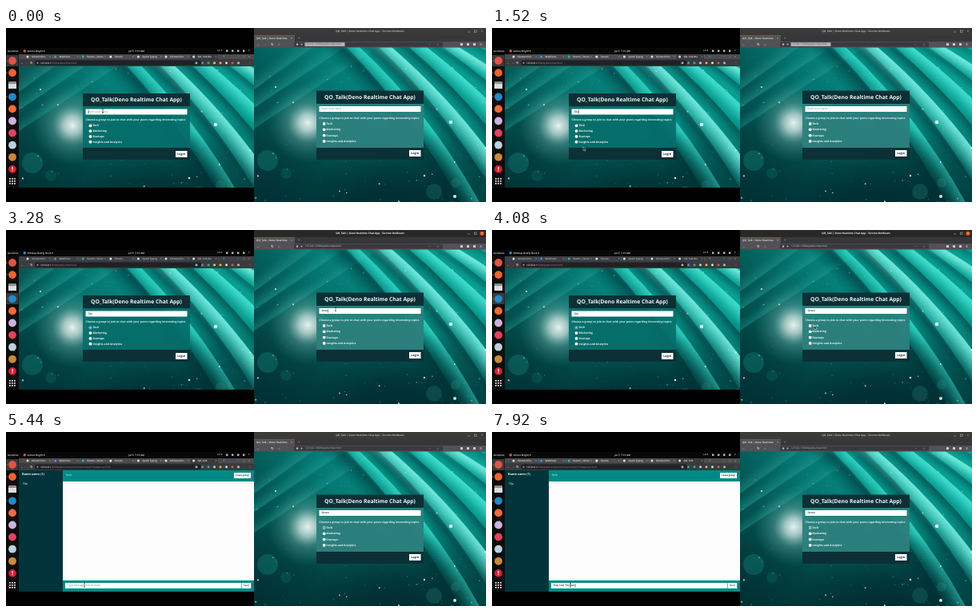
An HTML page with a canvas that plays this animation: 600 px wide and 218 px high, repeating every 8000 ms.

```html
<!DOCTYPE html>
<html lang="en">
<head>
<meta charset="utf-8">
<title>Chat demo</title>
<style>
html, body { margin: 0; width: 100%; height: 100%; overflow: hidden; background: #000; }
canvas { display: block; width: 600px; height: 218px; }
</style>
</head>
<body>
<canvas id="stage" width="600" height="218"></canvas>
<script>
const LOOP = 8000;
const APP = 'QO_Talk', USER = 'Tilo', PEER = 'Ovren';
const MESSAGE = `Hey I am ${USER} Ban`;
const TOPICS = ['Tech', 'Marketing', 'Startups', 'Insights and Analytics'];
const HOST = '127.0.0.1:5500/public/';
const DARK = '#0b3036';
const canvas = document.getElementById('stage');
let c = canvas.getContext('2d');

function rect(x, y, w, h, color) {
  c.fillStyle = color;
  c.fillRect(x, y, w, h);
}
function round(x, y, w, h, r, color) {
  c.fillStyle = color;
  c.beginPath();
  c.roundRect(x, y, w, h, r);
  c.fill();
}
function dot(x, y, r, color) {
  c.fillStyle = color;
  c.beginPath();
  c.arc(x, y, r, 0, 7);
  c.fill();
}
function line(color, width, ...points) {
  c.strokeStyle = color;
  c.lineWidth = width;
  c.beginPath();
  for (let i = 0; i < points.length; i += 2) c.lineTo(points[i], points[i + 1]);
  c.stroke();
}
function text(str, x, y, size, color, weight = 400, align = 'left') {
  c.font = `${weight} ${size}px "Open Sans", sans-serif`;
  c.textRendering = 'geometricPrecision';
  c.textBaseline = 'middle';
  c.textAlign = align;
  c.fillStyle = color;
  c.fillText(str, x, y);
  return c.measureText(str).width;
}

// Wallpaper, painted once and shown in both windows
function makeWallpaper() {
  const W = 294, H = 194;
  const layer = document.createElement('canvas');
  layer.width = W;
  layer.height = H;
  const screen = c;
  c = layer.getContext('2d');

  function wash(gradient, stops) {
    stops.forEach(stop => gradient.addColorStop(...stop));
    rect(0, 0, W, H, gradient);
  }
  wash(c.createLinearGradient(0, H, W, 0),
    [[0, '#01383b'], [.25, '#035553'], [.45, '#057671'], [.62, '#078a82'], [1, '#0aa79a']]);
  wash(c.createLinearGradient(0, 80, 0, H), [[0, 'rgba(0,44,48,0)'], [1, 'rgba(0,44,48,.7)']]);

  // A curved band from the top edge to the bottom, fading in towards its right side
  function beam(top, bottom, width, bulge, rgb, alpha) {
    c.lineWidth = 1.5;
    for (let i = 0; i < width; i++) {
      c.strokeStyle = `rgba(${rgb},${alpha * (i / width) ** 1.6})`;
      c.beginPath();
      c.moveTo(top + i, 0);
      c.quadraticCurveTo((top + bottom) / 2 + i + bulge, H / 2 - bulge, bottom + i, H);
      c.stroke();
    }
  }
  beam(40, -230, 34, 0, '40,150,140', .28);
  beam(80, -210, 34, 0, '40,160,150', .25);
  beam(126, -170, 30, 0, '40,160,150', .2);
  beam(80, 222, 36, 12, '0,50,54', .5);
  beam(106, 256, 26, 14, '50,215,198', .75);
  beam(132, 282, 24, 14, '0,66,68', .75);
  beam(140, 305, 32, 14, '120,240,226', .8);
  beam(172, 338, 22, 14, '0,84,82', .7);
  beam(186, 372, 30, 14, '70,228,212', .75);
  beam(216, 420, 20, 14, '0,100,96', .6);
  beam(226, 470, 30, 14, '120,240,225', .65);
  beam(256, 530, 26, 14, '0,122,114', .5);

  wash(c.createRadialGradient(190, 225, 10, 190, 225, 125),
    [[0, 'rgba(0,40,44,.9)'], [.5, 'rgba(0,40,44,.6)'], [1, 'rgba(0,40,44,0)']]);
  wash(c.createRadialGradient(67, 95, 0, 67, 95, 50),
    [[0, 'rgba(238,246,244,.97)'], [.22, 'rgba(205,228,224,.78)'], [.5, 'rgba(120,180,174,.38)'], [1, 'rgba(60,150,142,0)']]);

  dot(17, 142, 13, 'rgba(20,130,122,.4)');
  dot(40, 158, 7, 'rgba(20,130,122,.22)');
  dot(225, 181, 10, 'rgba(60,165,155,.2)');
  dot(252, 170, 6, 'rgba(60,165,155,.2)');

  let seed = 11;
  const random = () => (seed = seed * 16807 % 2147483647) / 2147483647;
  for (let i = 0; i < 130; i++) {
    const x = random() * W, y = H * (1 - random() ** 1.5 * .9);
    dot(x, y, .3 + random() ** 3 * .8, `rgba(225,255,250,${.35 + random() * .6})`);
  }
  dot(246, 94, 2.3, '#d5f4ef');
  dot(251, 187, 2, '#c4eee6');
  dot(213, 161, 1.2, '#d5f4ef');
  dot(27, 50, 1, '#d5f4ef');
  c = screen;
  return layer;
}
const wallpaper = makeWallpaper();

// Characters of str visible when typing starts at start with one key per step
const typed = (str, t, start, step) => str.slice(0, Math.max(0, Math.floor((t - start) / step) + 1));

function field(x, y, w, h, value, hint, caret) {
  rect(x, y, w, h, '#fff');
  const width = text(value || hint, x + 3, y + h / 2, 3.2, value ? '#222' : '#777', value ? 600 : 400);
  if (caret) rect(x + 3.3 + (value ? width : 0), y + 1.2, .5, h - 2.4, '#222');
}

function loginForm(x, top, { bodyTop, bodyColor, fieldY, labelY, radioY, gap, radioX, buttonY, value, caret, chosen }) {
  rect(x, top, 134, bodyTop - top, DARK);
  rect(x, bodyTop, 134, 150 - bodyTop, bodyColor);
  rect(x, 150, 134, 15, DARK);
  text(`${APP}(Deno Realtime Chat App)`, x + 67, (top + bodyTop) / 2 + .2, 6.75, '#f2f7f7', 700, 'center');
  field(x + 3.5, fieldY, 127, 7, value, 'Enter your name', caret);
  text('Choose a group to join to chat with your peers regarding interesting topics', x + 3.5, labelY, 3.38, '#e6f3f2', 700);
  TOPICS.forEach((topic, i) => {
    const y = radioY + i * gap;
    dot(x + radioX, y, 1.9, '#fff');
    if (chosen && i === 0) {
      dot(x + radioX, y, 1.6, '#1976d2');
      dot(x + radioX, y, .7, '#fff');
    }
    text(topic, x + radioX + 2.9, y + .2, 3.38, '#eef7f6', 700);
  });
  rect(x + 116, buttonY, 14.5, 8, '#fff');
  text('Login', x + 123.2, buttonY + 4, 3.6, '#17282b', 700, 'center');
}

function desktop(focusLeft) {
  rect(0, 25, 310, 8, '#080808');
  text('Activities', 2, 28.7, 3.1, '#e6e6e6', 600);
  dot(23.3, 28.7, 1.7, focusLeft ? '#d9574a' : '#2c8fd0');
  text(focusLeft ? 'Velora Bright ▾' : 'Nimbus Drafty Desk ▾', 26.5, 28.7, 3.1, '#e6e6e6', 600);
  text('Jul 5  7:15 AM', 163, 28.7, 3.1, '#eee', 600, 'center');
  text('en ▾', 264, 28.7, 3, '#ccc', 600);
  [275, 282, 289, 296].forEach(x => rect(x, 27.5, 2.4, 2.4, '#bbb'));
  text('▾', 303, 28.7, 3, '#ccc');

  rect(0, 33, 16, 167, '#0d0d0d');
  rect(.5, focusLeft ? 34 : 79, 15, 14, '#3a3a3a');
  const colors = ['#de5546', '#ee6430', '', '#2489ca', '#f36c3b', '#cdb4de', '#e2445c', '#b9d3dc', '#c98a3a', '#d51f35'];
  colors.forEach((color, i) => {
    if (color) dot(8, 41 + i * 15.1, 4.9, color);
  });
  round(3, 67, 10, 9, 1, '#8f8f8f');
  rect(3, 70, 10, 6, '#dedede');
  rect(7.4, 174, 1.2, 3.4, '#fff');
  rect(7.4, 178.3, 1.2, 1.2, '#fff');
  for (let i = 0; i < 9; i++) rect(4 + i % 3 * 3, 188 + Math.floor(i / 3) * 3, 1.8, 1.8, '#ddd');
  [41, 56, 86].forEach(y => dot(1, y, .7, '#e95420'));
}

function leftBrowser(focused, inChat) {
  rect(16, 33, 294, 6.5, focused ? '#4b4c4f' : '#3f4043');
  rect(16, 39, 294, 9, '#3a3b3e');
  const tabs = ['tilomon23/c', 'WebTools', 'Events | Deno', 'Tunelo', 'Quick Typing', 'tilomon23/c', inChat ? APP : `${APP} (De`];
  const icons = ['#ddd', '#4a90d9', '#28b5b0', '#eee', '#ddd', '#ddd', '#ddd'];
  tabs.forEach((name, i) => {
    const x = 26 + i * 34.6;
    if (i === 6) round(x - 3, 33.5, 35, 6, [2, 2, 0, 0], '#3a3b3e');
    dot(x + 1, 36, 1.5, icons[i]);
    text(name, x + 6, 36, 3, focused ? '#eceded' : '#c4c6c8', 600);
    text('×', x + 28, 36, 3.4, '#ddd');
    rect(x + 32, 34.5, .4, 3.5, '#777');
  });
  text('+', 271, 36, 4, '#ccc');
  ['−', '□', '×'].forEach((s, i) => text(s, 289 + i * 7, 36, 3.6, '#ccc'));
  text('←', 18, 43.7, 4, '#ddd', 600);
  text('→', 24, 43.7, 4, '#888', 600);
  text('↻', 30, 43.7, 4, '#ddd', 600);
  round(36, 40.5, 208, 6.3, 3, '#202124');
  dot(39.5, 43.7, 1, '#aaa');
  const hostWidth = text('127.0.0.1', 43, 43.7, 3.05, '#eee', 600);
  const path = inChat ? `:5500/public/index.html?username=${USER}&group=Tech` : ':5500/public/chat.html';
  text(path, 43 + hostWidth, 43.7, 3.05, '#969a9e');
  ['#aaa', '#4a92d8', '#35b369', '#ccc', '#e8b53b', '#ddd', '#dc5547', '#bbb']
    .forEach((color, i) => dot(238 + i * 7.5, 43.7, 1.5, color));
  text('⋮', 303, 43.7, 4, '#ccc');
}

function chatPage(value, caret) {
  rect(16, 48, 55, 152, '#00343a');
  text('Room users (1)', 20, 53.5, 3.8, '#fff', 700);
  text(USER, 21, 65, 3.4, '#e5f0f0', 600);
  rect(71, 48, 239, 152, '#008a86');
  text('Tech', 74.5, 54.5, 3.6, '#e4f5f3');
  rect(285, 51, 21, 7, '#fff');
  text('Leave group', 295.5, 54.5, 2.7, '#222', 700, 'center');
  rect(71, 62, 239, 124, '#fdfdfd');
  field(74, 189, 220, 7, value, 'Type message click to enter', caret);
  rect(294.6, 189, 11.6, 7, '#fff');
  text('Send', 300.4, 192.5, 2.8, '#222', 600, 'center');
}

function rightBrowser(focused, addressSelected) {
  rect(310, 0, 290, 9, focused ? '#2a2827' : '#3c3a38');
  text(`${APP} | Deno Realtime Chat App - Tarvine Owlbeam`, 455, 4.2, 3.2, focused ? '#f0f0f0' : '#b4b2b0', 700, 'center');
  line('#aaa', .6, 577, 5, 580, 5);
  c.strokeRect(585.5, 3, 2.6, 2.6);
  if (focused) dot(595, 4.3, 2.6, '#e9562a');
  text('×', 595, 4.2, 4, '#ddd', 400, 'center');
  rect(310, 9, 290, 8, '#37363a');
  rect(310, 9, 51, 8, '#525155');
  rect(310, 9, 51, .6, '#c0483a');
  text(`${APP} | Deno Realtime`, 313, 13.2, 3.2, '#eee', 600);
  text('×', 356, 13.2, 3.8, '#ddd');
  text('+', 365, 13.2, 4.2, '#ccc');
  rect(310, 17, 290, 7.5, '#525155');
  ['←', '→', '↻', '⌂'].forEach((s, i) => text(s, 313 + i * 9, 20.5, 4.3, i === 1 ? '#888' : '#ddd', 600));
  round(360, 17.7, 186, 5.8, 1, '#3a393d');
  dot(364, 20.5, 1.2, '#bbb');
  dot(369.5, 20.5, 1.1, '#aaa');
  if (addressSelected) rect(373.5, 18.2, 50, 4.6, '#b9b9b9');
  text(`${HOST}chat.html`, 374, 20.5, 3.05, addressSelected ? '#444' : focused ? '#ddd' : '#bbb');
  text('…', 528, 20, 4, '#ccc');
  text('☆', 538, 20.5, 4, '#ccc');
  [568, 576, 584].forEach(x => rect(x, 19, 3, 3, '#ccc'));
  text('≡', 592, 20.5, 5, '#ddd');
}

// Pointer stops: time, x, y
const STOPS = [
  [0, 121, 104], [1120, 121, 104], [1520, 114, 149], [1800, 105, 122], [1940, 105, 122],
  [2320, 415, 77], [2540, 412, 99], [3620, 412, 99], [4040, 403, 120], [4320, 403, 120],
  [4880, 219, 158], [5080, 219, 158], [5420, 98, 192], [8000, 98, 192]
];
function pointerAt(t) {
  const i = STOPS.findIndex(stop => stop[0] > t);
  const [t0, x0, y0] = STOPS[i - 1], [t1, x1, y1] = STOPS[i];
  const p = (t - t0) / (t1 - t0), e = p * p * (3 - 2 * p);
  return [x0 + (x1 - x0) * e, y0 + (y1 - y0) * e];
}
function drawPointer(t) {
  const [x, y] = pointerAt(t);
  const overText = t < 1160 || (t > 2500 && t < 3680) || t > 5400;
  if (overText) {
    line('#333', .6, x - 1, y - 2.4, x + 1, y - 2.4);
    line('#333', .6, x, y - 2.4, x, y + 2.4);
    line('#333', .6, x - 1, y + 2.4, x + 1, y + 2.4);
    return;
  }
  c.beginPath();
  [[0, 0], [0, 4.6], [1.1, 3.6], [1.9, 5.2], [2.6, 4.9], [1.9, 3.3], [3.3, 3.2]]
    .forEach(([dx, dy]) => c.lineTo(x + dx, y + dy));
  c.closePath();
  c.fillStyle = '#111';
  c.fill();
  c.strokeStyle = '#eee';
  c.lineWidth = .45;
  c.stroke();
}

function render(t) {
  const focusRight = t >= 2560 && t < 4880;
  const inChat = t >= 5040;
  const blink = t % 1040 < 560;

  rect(0, 0, 600, 218, '#000');
  desktop(!focusRight);
  if (inChat) {
    chatPage(typed(MESSAGE, t, 5760, 130), t > 5520 && (blink || t > 7800));
  } else {
    c.drawImage(wallpaper, 0, 21, 294, 152, 16, 48, 294, 152);
    loginForm(96, 82, {
      bodyTop: 98, bodyColor: 'rgba(6,110,107,.92)', fieldY: 101.5, labelY: 115,
      radioY: 122.3, gap: 6.8, radioX: 9.5, buttonY: 154,
      value: typed(USER, t, 560, 150), caret: t < 1800 && blink, chosen: t >= 1880
    });
  }
  leftBrowser(!focusRight, inChat);

  c.drawImage(wallpaper, 310, 24);
  loginForm(388, 78.5, {
    bodyTop: 95, bodyColor: 'rgba(44,128,125,.96)', fieldY: 98, labelY: 113,
    radioY: 120, gap: 7.3, radioX: 9.7, buttonY: 153,
    value: typed(PEER, t, 2880, 120), caret: t >= 2560 && t < 4200 && (blink || t < 3600), chosen: t >= 4240
  });
  rightBrowser(focusRight, t < 2560);
  drawPointer(t);
}

function tick(now) {
  render(now % LOOP);
  requestAnimationFrame(tick);
}
requestAnimationFrame(tick);
</script>
</body>
</html>
```
